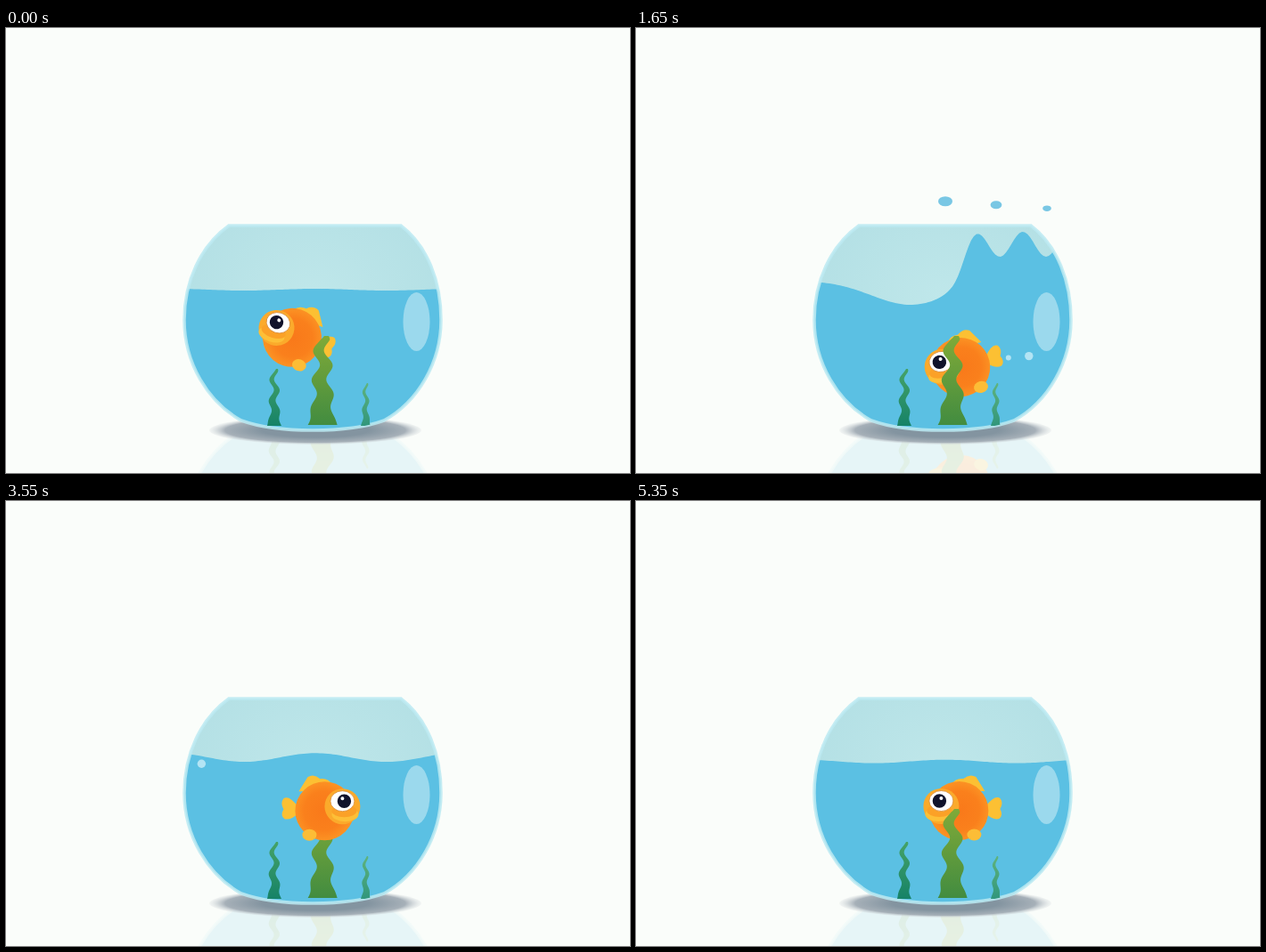
Animation of 700 by 500 pixels, one loop 5.4 s. Source, as an HTML page:

```html
<!DOCTYPE html>
<html lang="en">
<head>
<meta charset="utf-8">
<title>Goldfish</title>
<style>
html, body { margin: 0; width: 100%; height: 100%; overflow: hidden; background: #fafdfa; }
svg { display: block; width: 700px; height: 500px; }
</style>
</head>
<body>
<svg viewBox="0 0 700 500">
  <defs>
    <radialGradient id="glass" cx=".5" cy=".35" r=".6">
      <stop offset="0" stop-color="#bfe7ea"/><stop offset="1" stop-color="#b2dfe4"/>
    </radialGradient>
    <radialGradient id="shade">
      <stop offset=".5" stop-color="#8394a0"/><stop offset=".85" stop-color="#a6b0b8"/>
      <stop offset="1" stop-color="#d2d8db" stop-opacity=".2"/>
    </radialGradient>
    <radialGradient id="skin" cx=".48" cy=".5" r=".55">
      <stop offset="0" stop-color="#f9791a"/><stop offset=".6" stop-color="#fa801c"/><stop offset="1" stop-color="#fc9826"/>
    </radialGradient>
    <linearGradient id="leaf" x1="0" y1="0" x2="0" y2="1">
      <stop offset="0" stop-color="#80aa38"/><stop offset="1" stop-color="#428c40"/>
    </linearGradient>
    <linearGradient id="teal" x1="0" y1="0" x2="0" y2="1">
      <stop offset="0" stop-color="#45a267"/><stop offset="1" stop-color="#168267"/>
    </linearGradient>
    <linearGradient id="mint" x1="0" y1="0" x2="0" y2="1">
      <stop offset="0" stop-color="#5fb37c"/><stop offset="1" stop-color="#31967c"/>
    </linearGradient>
    <path id="bowlShape" d="M250 222H443C473 245 488 285 488 328C488 376 462 420 424 441Q394 452 344 452Q294 452 264 441C226 420 200 376 200 328C200 285 218 245 250 222Z"/>
    <clipPath id="inside"><use href="#bowlShape"/></clipPath>
    <clipPath id="floor"><rect y="456" width="700" height="44"/></clipPath>
  </defs>

  <g clip-path="url(#floor)"><use href="#scene" transform="translate(0 894) scale(1 -1)" opacity=".12"/></g>
  <ellipse cx="347" cy="452" rx="119" ry="16" fill="url(#shade)"/>
  <g id="scene">
    <use href="#bowlShape" fill="url(#glass)"/>
    <g clip-path="url(#inside)"><path id="water" fill="#5bc0e3"/></g>
    <use href="#bowlShape" fill="none" stroke="#bdeaf3" stroke-width="3.500" stroke-opacity=".85"/>
    <g id="back"></g>
    <g id="weeds" clip-path="url(#inside)"></g>
    <g id="front"></g>
    <g id="dots"></g>
    <ellipse cx="460.500" cy="330" rx="15" ry="33" fill="#c4e8f4" fill-opacity=".62"/>
  </g>

  <g id="fish">
    <g id="fins" fill="#fcc033">
      <path d="M-30-5Q-40-18-46-14Q-50-9-46-2Q-50 5-45 9Q-38 11-30 3Z"/>
      <path d="M-29-22Q-24-30-19-38Q-12-42-5-36Q4-37 8-30L-8-22Z"/>
    </g>
    <circle r="33" fill="url(#skin)"/>
    <ellipse id="belly" cy="27" rx="8" ry="6.500" fill="#fcbd36"/>
    <circle id="cheek" cy="-5" r="20" fill="#fbaa2b"/>
    <g id="look">
      <ellipse cx="4" cy="15" rx="15" ry="8" fill="#fdbf37"/>
      <ellipse cx="3" cy="11" rx="14" ry="7" fill="#fba127"/>
      <ellipse cx="1" rx="13.500" ry="11.500" fill="#fff" stroke="#d98a32" stroke-width=".8"/>
      <circle cx="3" r="7.700" fill="#11132b"/>
      <circle cx="1" cy="-3" r="2" fill="#fff"/>
    </g>
  </g>
</svg>
<script>
const LOOP = 5.4, STEP = 0.05;
const DIVE = 1.4, LEFT_TURN = 2.4, RIGHT_TURN = 4.6;
const $ = id => document.getElementById(id);
const clamp = v => Math.max(0, Math.min(1, v));
const part = (t, from, to) => clamp((t - from) / (to - from));
const mix = (a, b, k) => a + (b - a) * k;
const ramp = (t, from, to) => { const k = part(t, from, to); return k * k * (3 - 2 * k); };
const bell = (x, mid, width) => Math.exp(-(((x - mid) / width) ** 2));

// Leap out in an arc, plunge, then cruise between the two sides.
function position(t) {
  if (t < DIVE) return [321 + 46.4 * t, 81 + 494 * (t - 0.735) ** 2];
  const s = t - DIVE, y = 348 + Math.exp(-4 * s) * (555 * s - 49);
  if (t < LEFT_TURN) return [mix(386, 247, ramp(t, DIVE, LEFT_TURN)), y];
  const k = part(t, LEFT_TURN, RIGHT_TURN);
  const back = part(t, RIGHT_TURN, LOOP) ** 1.5;
  return [mix(247, 445, k * (1.14 - 0.14 * k)) - 91 * back, y];
}
const pitch = t => t < DIVE ? -18 + 42 * t : 41 * Math.exp(-4.5 * (t - DIVE));
const facing = t => 2 * (ramp(t, 0.12, 0.32) - ramp(t, DIVE, 1.58)
  + ramp(t, 2.2, LEFT_TURN) - ramp(t, RIGHT_TURN, 4.8)) - 1;

// Ripples from the leap, a high splash from the plunge, then a slow calming.
function surface(t) {
  const leap = ramp(t, 0.1, 0.4) * (1 - ramp(t, DIVE, 1.6));
  const slosh = 11 * ramp(t, DIVE, 2.25) * Math.exp(-0.8 * (t - 2.25));
  const splash = ramp(t, DIVE, 1.62) * (1 - ramp(t, 1.72, 2.25));
  const size = 1 + 5 * leap + slosh, level = 294 - 5 * leap - 1.5 * slosh;
  let d = "M190 460";
  for (let x = 190; x <= 496; x += 3) {
    const wave = level - size * Math.cos((x - 347) * Math.PI / 80) - 13 * leap * bell(x, 445, 35);
    const hollow = 284 + 27 * bell(x, 308, 62);
    const crest = 243 - 14 * Math.cos((x - 382) * Math.PI / 26);
    const crown = mix(hollow, crest, 1 / (1 + Math.exp((363 - x) / 6)));
    d += `L${x} ${mix(wave, crown, splash).toFixed(1)}`;
  }
  return d + "V460Z";
}

function weed(x, top, tip, base, sway, period, fill) {
  const left = [], right = [], bottom = 447;
  for (let y = top; y <= bottom; y += 2) {
    const k = (y - top) / (bottom - top);
    const mid = x + sway * (1 - k ** 3) * Math.cos((y - top) * 2 * Math.PI / period);
    const half = mix(tip, base, 0.55 * k + 0.45 * k ** 8) * Math.min(1, 0.5 + k * 12);
    left.push(`${mid - half} ${y}`);
    right.unshift(`${mid + half} ${y}`);
  }
  return `<path fill="url(#${fill})" d="M${left.join("L")}L${right.join("L")}Z"/>`;
}

const dot = (x, y, rx, ry, fill, alpha) =>
  `<ellipse cx="${x}" cy="${y}" rx="${rx}" ry="${ry}" fill="${fill}" opacity="${alpha}"/>`;

// Two bubbles rise until they burst at the surface.
function puff(t, start, x, y, gapX, gapY) {
  const s = t - start;
  if (s < 0 || s > 1.2) return "";
  return [0, 1].map(i => {
    const top = y + gapY * i - 52 * s, r = 3 + 1.7 * i;
    return top < 292 ? "" : dot(x + gapX * i + 9 * s, top, r, r, "#c9ecf7", 0.8);
  }).join("");
}

// Three drops thrown up and falling back.
function spray(t, start, x, gap, top, size) {
  const s = t - start, fall = 468 * (s - 0.27) ** 2;
  if (s < 0 || s > 0.72) return "";
  return [0, 1, 2].map(i => {
    const r = size * (1 - 0.2 * i);
    return dot(x + gap * i, top + 4 * i + fall, r, r * 0.7, "#79c7e4", part(s, 0.72, 0.57));
  }).join("");
}

function render(t) {
  const [x, y] = position(t), face = facing(t), wide = Math.abs(face);
  const down = Math.sin(Math.PI * part(t, 0.65, 1.55));
  $("water").setAttribute("d", surface(t));
  $("dots").innerHTML = puff(t, 1.45, 416, 381, 23, -2) + puff(t, LEFT_TURN, 217, 340, -8, 15)
    + spray(t, 0.35, 300, 23, 100, 4) + spray(t, 1.5, 347, 57, 188, 8);
  $("fish").setAttribute("transform",
    `translate(${x} ${y}) scale(${face < 0 ? -1 : 1} 1) rotate(${pitch(t) * wide})`);
  $("fins").setAttribute("transform", `scale(${wide} 1)`);
  $("belly").setAttribute("cx", -17 * wide);
  $("cheek").setAttribute("cx", 20 * wide);
  $("look").setAttribute("transform",
    `translate(${(19 + 2 * down) * wide} ${-11 + 18 * down}) scale(${0.6 + 0.4 * wide} 1)`);
  const layer = $(face < 0 ? "back" : "front");
  if ($("fish").parentNode !== layer) layer.appendChild($("fish"));
}

$("weeds").innerHTML = weed(301, 383, 2, 8, 3, 24, "teal") + weed(355, 346, 5, 17, 4.5, 33, "leaf")
  + weed(403.5, 399, 1.2, 5.5, 2, 20, "mint");

const start = performance.now();
function tick(now) {
  const t = Math.max(0, now - start) / 1000 % LOOP;
  render(Math.floor(t / STEP + 1e-6) * STEP);
  requestAnimationFrame(tick);
}
render(0);
requestAnimationFrame(tick);
</script>
</body>
</html>
```
